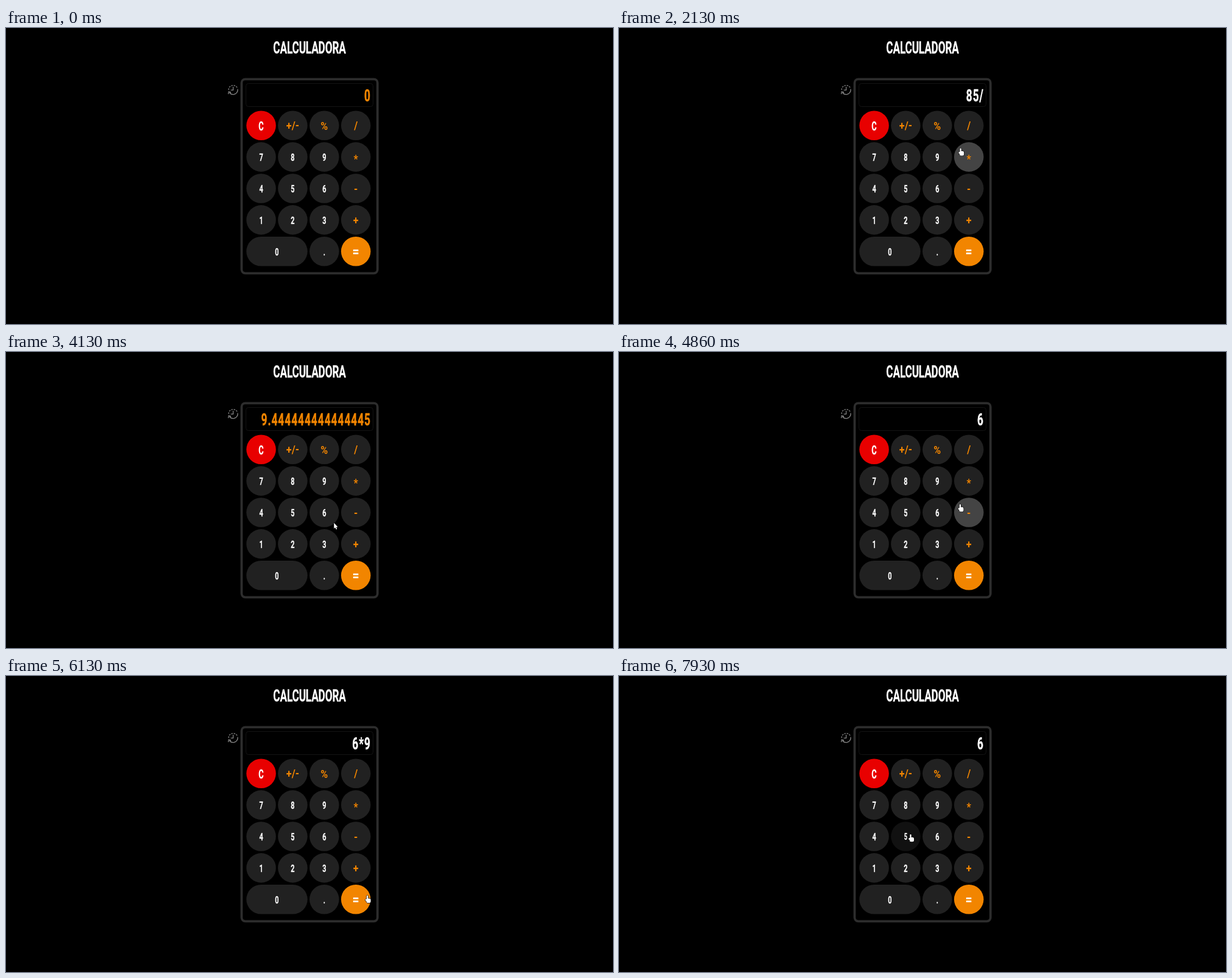
These frames come from a looping animation (998 px wide and 488 px high, 8000 ms). An HTML page with a canvas:

```html
<!DOCTYPE html>
<html lang="pt">
<head>
<meta charset="utf-8">
<title>Calculadora</title>
<style>
html, body { margin: 0; width: 100%; height: 100%; overflow: hidden; background: #000; }
canvas { display: block; }
</style>
</head>
<body>
<canvas id="stage" width="998" height="488"></canvas>
<script>
const ctx = document.getElementById('stage').getContext('2d');
const LOOP = 8000, STEP = 200 / 3;
const PITCH = 51.9, R = 24.3, LEFT = 419.5, TOP = 160.7;
const ORANGE = '#f28500', WHITE = '#fff', GREY = '#212121', RED = '#e80000';
const NARROW = 0.64, MEDIUM = 0.85;

// Keypad grid; an underscore is the second half of the wide zero.
const keys = {};
['C±%/', '789*', '456-', '123+', '0_.='].forEach((row, r) =>
  [...row].forEach((id, c) => {
    const isOp = '±%/*-+='.includes(id);
    keys[id] = {
      label: id === '±' ? '+/-' : id, isOp,
      x: LEFT + c * PITCH, y: TOP + r * PITCH,
      wide: id === '0' ? PITCH : 0,
      size: id === '=' ? 23 : id === 'C' ? 20 : isOp ? 19 : 17,
      fill: id === 'C' ? RED : id === '=' ? ORANGE : GREY,
      ink: isOp && id !== '=' ? ORANGE : WHITE
    };
  }));
delete keys._;

// Clicks: key, time the pointer sets off, time of the press.
const CLICKS = [
  ['8', 200, 1060], ['5', 1160, 1390], ['/', 1490, 1860], ['9', 1960, 2450],
  ['=', 2550, 3050], ['6', 3860, 4310], ['*', 4730, 5080], ['9', 5180, 5590],
  ['=', 5670, 6290], ['6', 6930, 7390], ['5', 7490, 7920]
];
const ENTER = 60, SETTLE = 100, HOLD = 125, REACT = 70, SAG = 20;

const MATH = {
  '+': (a, b) => a + b, '-': (a, b) => a - b,
  '*': (a, b) => a * b, '/': (a, b) => a / b
};

function readout(t) {
  let value = '0', done = true;
  for (const [id, , press] of CLICKS) {
    if (t < press + REACT) break;
    if (id === '=') {
      const [, a, op, b] = value.match(/([\d.]+)(\D)([\d.]+)/);
      value = String(MATH[op](+a, +b));
    } else {
      value = done ? id : value + id;
    }
    done = id === '=';
  }
  return { value, color: done ? ORANGE : WHITE };
}

function aim(id) {
  const k = keys[id];
  return { x: k.x + (id === '=' ? 21 : 8), y: k.y - 3 };
}

// Each trip eases from key to key and sags a little on the way.
function pointer(t) {
  if (t < ENTER) return null;
  let at = { x: 726, y: 30 };
  for (const [id, leave, press] of CLICKS) {
    if (t < leave) break;
    const u = Math.min(1, (t - leave) / (press - SETTLE - leave));
    const s = u * u * (3 - 2 * u), to = aim(id);
    at = {
      x: at.x + (to.x - at.x) * s,
      y: at.y + (to.y - at.y) * s + SAG * Math.sin(Math.PI * s)
    };
  }
  return at;
}

function text(str, x, y, size, color, { align = 'center', gap = 0, face = NARROW, bold = 0.3, middle = false } = {}) {
  ctx.save();
  ctx.font = `700 ${size}px Roboto, "Liberation Sans", sans-serif`;
  ctx.letterSpacing = gap + 'px';
  ctx.textAlign = align;
  if (middle) {
    const m = ctx.measureText(str);
    y += (m.actualBoundingBoxAscent - m.actualBoundingBoxDescent) / 2;
  }
  ctx.translate(x, y);
  ctx.scale(face, 1);
  ctx.fillStyle = ctx.strokeStyle = color;
  ctx.lineWidth = bold;
  ctx.lineJoin = 'round';
  ctx.fillText(str, 0, 0);
  if (bold) ctx.strokeText(str, 0, 0);
  ctx.restore();
}

function box(x, y, w, h, r, color, width) {
  ctx.beginPath();
  ctx.roundRect(x, y, w, h, r);
  ctx.strokeStyle = color;
  ctx.lineWidth = width;
  ctx.stroke();
}

function historyIcon(x, y) {
  const r = 7.5;
  ctx.strokeStyle = '#858585';
  ctx.lineWidth = 1.3;
  ctx.beginPath();
  ctx.arc(x, y, r, -0.2, 2.5);
  ctx.moveTo(x, y - 5);
  ctx.lineTo(x, y + 0.4);
  ctx.lineTo(x - 4, y + 0.4);
  ctx.moveTo(x - 8, y + 7);
  ctx.lineTo(x - 7.4, y + 3);
  ctx.lineTo(x - 3.6, y + 4);
  ctx.stroke();
  ctx.setLineDash([2.6, 1.6]);
  ctx.beginPath();
  ctx.arc(x, y, r, Math.PI, -0.3);
  ctx.stroke();
  ctx.setLineDash([]);
}

function drawKey(k, hover, pressed) {
  ctx.fillStyle = k.fill !== GREY ? k.fill : pressed ? '#111' : hover ? '#444' : GREY;
  ctx.beginPath();
  ctx.roundRect(k.x - R, k.y - R, 2 * R + k.wide, 2 * R, R);
  ctx.fill();
  const scale = pressed ? 0.84 : 1, x = k.x + k.wide / 2;
  if (k.isOp) text(k.label, x, k.y + 0.8, k.size * scale, k.ink, { face: MEDIUM, bold: 0, middle: true });
  else text(k.label, x, k.y + 0.8 + k.size * 0.35 * scale, k.size * scale, k.ink);
}

const arrow = new Path2D('M0 0V9.2L2 7.4L3.5 10.8L5 10.1L3.6 6.9L6.2 6.6Z');
const hand = new Path2D();
hand.roundRect(-1.1, -0.4, 2.3, 9, 1.1);
hand.roundRect(-1.6, 4.4, 7.2, 7.4, 2.2);
hand.roundRect(-3.2, 5.6, 4, 3, 1.4);

function drawPointer({ x, y }, shape) {
  ctx.save();
  ctx.translate(x, y);
  ctx.lineJoin = 'round';
  ctx.strokeStyle = '#000';
  ctx.lineWidth = 1.2;
  ctx.stroke(shape);
  ctx.fillStyle = WHITE;
  ctx.fill(shape);
  ctx.restore();
}

function isOver(k, p) {
  const nearest = Math.min(Math.max(p.x, k.x), k.x + k.wide);
  return Math.hypot(p.x - nearest, p.y - k.y) < 21.8;
}

function draw(t) {
  ctx.fillStyle = '#000';
  ctx.fillRect(0, 0, 998, 488);
  text('CALCULADORA', 499, 42.4, 27, WHITE, { gap: -0.3 });
  historyIcon(373.5, 102);
  box(387.4, 84.4, 223.4, 319.9, 6, '#2d2d2d', 3.8);
  box(394.5, 91.5, 209, 38, 4, '#141414', 1);

  const { value, color } = readout(t);
  text(value, 600, 121.3, 27, color, { align: 'right', gap: 1.55, bold: 0.5 });

  const p = pointer(t);
  const target = p && Object.values(keys).find(k => isOver(k, p));
  const click = CLICKS.find(([, , press]) => t >= press && t < press + HOLD);
  for (const id in keys) drawKey(keys[id], keys[id] === target, click && click[0] === id);
  if (p) drawPointer(p, target ? hand : arrow);
}

const start = performance.now();
function tick() {
  const t = (performance.now() - start) % LOOP;
  draw(Math.floor((t + 7) / STEP) * STEP);
  requestAnimationFrame(tick);
}
tick();
</script>
</body>
</html>
```
